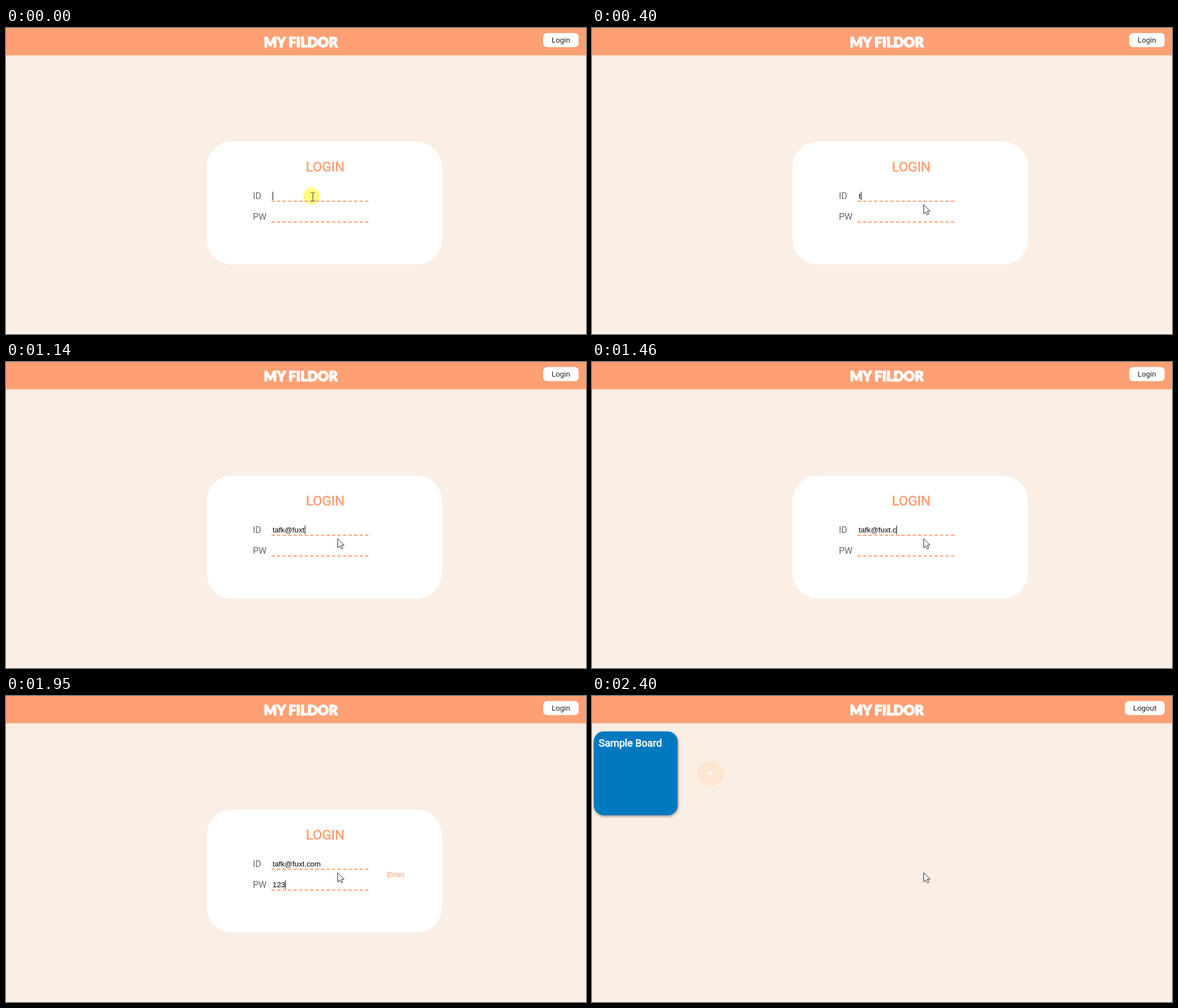
Write an HTML page that moves like this. It is 1029 px wide and 544 px high and loops after 2710 ms.

```html
<!DOCTYPE html>
<html lang="en">
<head>
<meta charset="utf-8">
<title>Login</title>
<style>
  html, body { margin: 0; width: 100%; height: 100%; overflow: hidden; background: #fbeee4; }
  svg { display: block; font: 13.333px "Liberation Sans", Arial, sans-serif; }
  .ui { font-family: Roboto, sans-serif; }
  .logo { font: 900 24px Lato, sans-serif; fill: #fff; stroke: #fff; stroke-width: 1.5; stroke-linejoin: round; }
  .heading { font-size: 24px; fill: #ffa074; stroke: #ffa074; stroke-width: .7; }
  .label { font-size: 16px; fill: #696969; }
  .line { stroke: #ffa074; stroke-width: 2; stroke-dasharray: 6 3.765; }
  .board { fill: #0079bf; filter: drop-shadow(1px 2px 2px #0006); }
  .name { font-size: 18px; fill: #fff; stroke: #fff; stroke-width: .7; }
</style>
</head>
<body>
<svg width="1029" height="544" viewBox="0 0 1029 544">
  <rect width="1029" height="48.5" fill="#ffa074"/>
  <text class="logo" x="523" y="34" text-anchor="middle">MY FILDOR</text>

  <g id="login">
    <rect x="953" y="9" width="63" height="25" rx="7" fill="#fff"/>
    <text class="ui" x="968" y="26" fill="#222">Login</text>
    <rect x="356" y="202" width="417.5" height="218.5" rx="45" fill="#fff"/>
    <circle id="click" cx="542" cy="299" r="15" fill="#fffb7d"/>
    <text class="ui heading" x="532" y="255">LOGIN</text>
    <text class="ui label" x="438" y="304">ID</text>
    <text class="ui label" x="438" y="341">PW</text>
    <path class="line" d="M471 308h172M471 345h172"/>
    <text id="user" x="473" y="303"></text>
    <text id="pass" x="473" y="340"></text>
    <rect id="caret" width="1" height="15"/>
    <text id="enter" x="676" y="322" fill="#ffa074">Enter</text>
  </g>

  <g id="home">
    <rect x="945.5" y="9" width="70.5" height="25" rx="7" fill="#fff"/>
    <text class="ui" x="960" y="26" fill="#222">Logout</text>
    <rect class="board" x="3" y="63" width="149" height="149" rx="18"/>
    <text class="ui name" x="12" y="90">Sample Board</text>
    <rect x="187" y="115" width="48" height="45" rx="23" fill="#ffe6d0"/>
    <path d="M204 137.5h11.5M209.75 132v11.5" stroke="#fff" stroke-width="2.5"/>
  </g>

  <path id="beam" d="M-3.5 -7.5h3M.5 -7.5h3M0 -7v14M-3.5 7.5h3M.5 7.5h3" stroke="#444"/>
  <path id="arrow" d="M588.5 314v16.5l3.8-3.6 2.6 5.3 2.6-1.2-2.6-5.2h5z" fill="#fff" stroke="#223"/>
</svg>
<script>
const LOOP = 2710, HOME = 2400, TAB = 1710;
const email = "tafk@fuxt.com", password = "123123";
// Time at which each character appears
const emailKeys = [400, 630, 700, 780, 850, 930, 1020, 1140, 1140, 1310, 1390, 1470, 1550];
const passKeys = [1780, 1860, 1940, 2010, 2090, 2170];

const el = id => document.getElementById(id);
const show = (id, on) => el(id).style.display = on ? "" : "none";
const typed = (text, keys, t) => text.slice(0, keys.filter(k => k <= t).length);

function draw(t) {
  el("user").textContent = typed(email, emailKeys, t);
  el("pass").textContent = typed(password, passKeys, t);

  const inPass = t >= TAB, field = el(inPass ? "pass" : "user");
  const width = field.textContent ? field.getComputedTextLength() : 0;
  el("caret").setAttribute("x", Math.round(473 + width));
  el("caret").setAttribute("y", inPass ? 328 : 291);
  show("caret", t < TAB || t >= passKeys[0]);

  show("click", t < 80);
  show("enter", t >= passKeys[0]);
  show("beam", t < 330);
  show("arrow", t >= 330);
  el("beam").setAttribute("transform", t < 250 ? "translate(544.5 300)" : "translate(566.5 307)");
  show("login", t < HOME);
  show("home", t >= HOME);
}

const start = performance.now();
function tick() {
  draw((performance.now() - start) % LOOP);
  requestAnimationFrame(tick);
}
tick();
</script>
</body>
</html>
```
